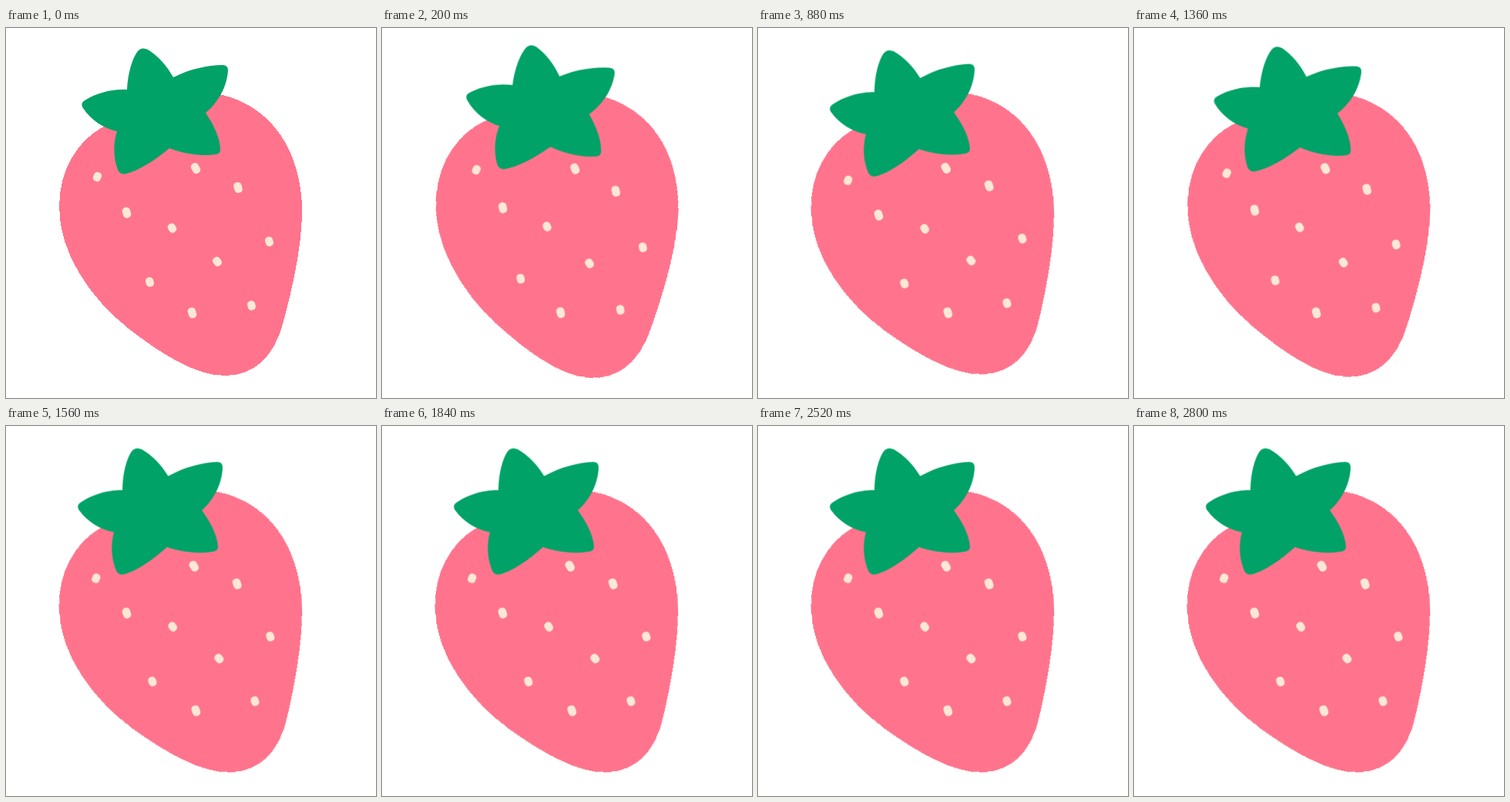
An HTML page that plays this animation: 480x480 px, repeating every 2.88 s.

```html
<!DOCTYPE html>
<html lang="en">
<head>
<meta charset="utf-8">
<title>Rocking strawberry</title>
<style>
  html, body { margin: 0; width: 100%; height: 100%; overflow: hidden; background: #fff; }
  svg { display: block; width: 100%; height: 100%; }

  #berry {
    --step: 2.16deg;
    transform-origin: 240px 240px;
    animation: rock 960ms step-end infinite;
  }

  /* The pose snaps between five evenly spaced angles. */
  @keyframes rock {
    0%, 50% { transform: rotate(0deg); }
    12.5%, 41.66% { transform: rotate(var(--step)); }
    20.83% { transform: rotate(calc(2 * var(--step))); }
    62.5%, 91.66% { transform: rotate(calc(-1 * var(--step))); }
    70.83% { transform: rotate(calc(-2 * var(--step))); }
    100% { transform: rotate(0deg); }
  }

  .body { fill: #ff748c; shape-rendering: crispEdges; }
  .leaf { fill: #00a267; }
  .seeds { fill: #fce8d5; }
</style>
</head>
<body>
<svg viewBox="0 0 480 480">
  <defs>
    <rect id="long" x="-5.2" y="-7" width="10.4" height="14" rx="4.6"/>
    <rect id="short" x="-5.1" y="-6.2" width="10.2" height="12.4" rx="4.5"/>
  </defs>
  <g id="berry">
    <path class="body" d="M69 232 C69 186 91 146 129 126.5 C170 106 225 75 279 86.5
      C344 101 384 160 384 238 C384 283 371 340 359 384 C348 424 324 451 284 451
      C244 451 198 420 159 390 C109 350 69 292 69 232Z"/>
    <path class="leaf" d="M157 80 C158 58 164 39 171 30 Q176 24 184 28 C197 36 208 48 217 64
      C239 53 262 48 281 48 Q288 48 288 55 C287 75 276 96 259 110
      C269 125 277 141 278 156 Q279 163 272 164 C252 167 231 163 212 156
      C193 172 172 185 156 189 Q148 191 145 184 C139 168 139 150 144 134
      C126 130 110 119 100 104 Q96 98 102 94 C118 84 138 79 157 80Z"/>
    <g class="seeds">
      <use href="#short" transform="translate(118.5 193) rotate(25)"/>
      <use href="#long" transform="translate(246 182) rotate(-28)"/>
      <use href="#long" transform="translate(301 207) rotate(-18)"/>
      <use href="#long" transform="translate(156.5 239.5) rotate(-16)"/>
      <use href="#short" transform="translate(215.5 259.5) rotate(-30)"/>
      <use href="#short" transform="translate(341.5 277) rotate(-16)"/>
      <use href="#short" transform="translate(274 303) rotate(-38)"/>
      <use href="#short" transform="translate(186.5 329.5) rotate(-18)"/>
      <use href="#long" transform="translate(241.5 369.5) rotate(-17)"/>
      <use href="#short" transform="translate(318.5 360) rotate(-15)"/>
    </g>
  </g>
</svg>
</body>
</html>
```
